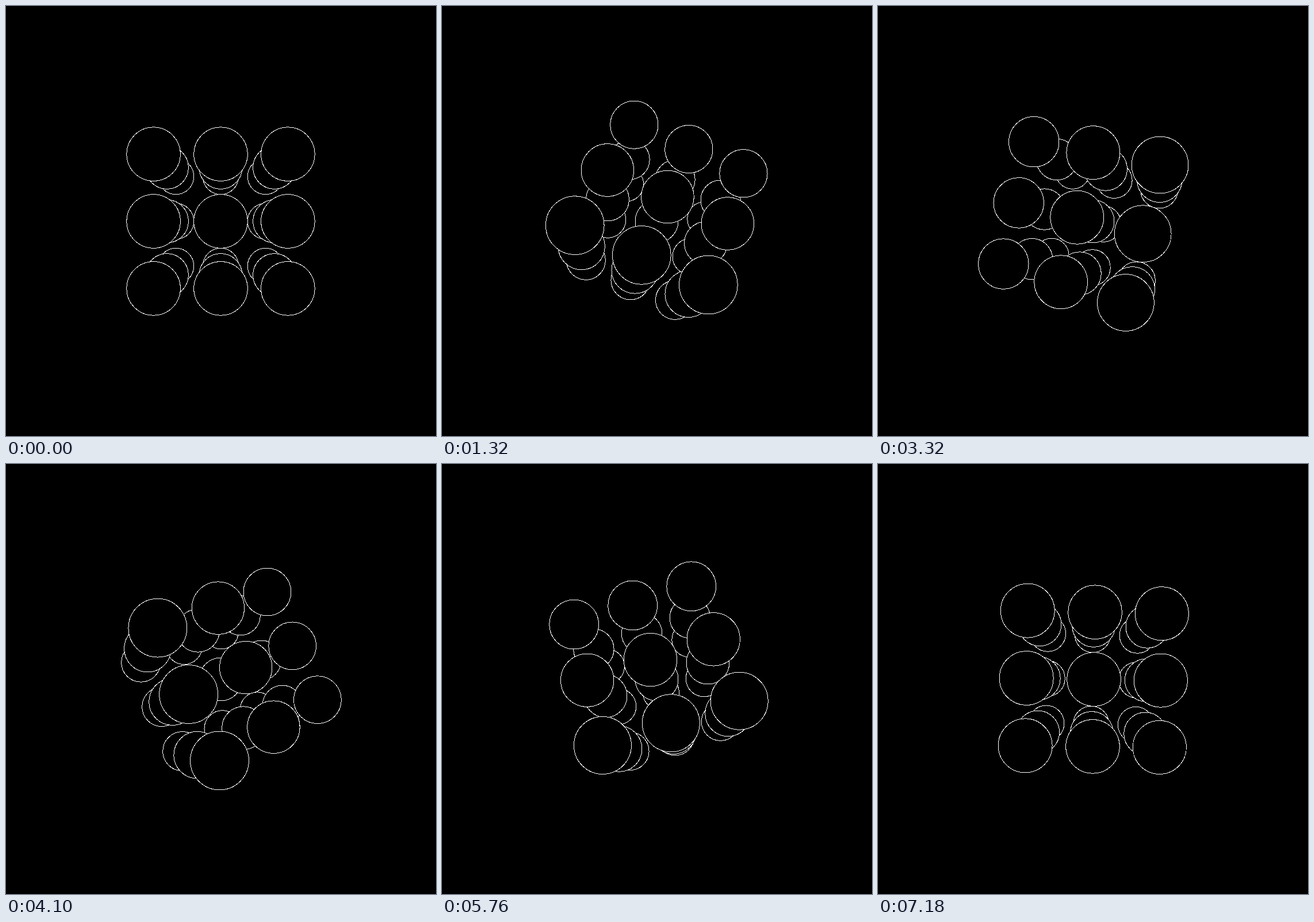
An HTML page for the animation above (7.2 s loop, 748 by 748 pixels).

```html
<!DOCTYPE html>
<html lang="en">
<head>
<meta charset="utf-8">
<title>Rotating lattice of circles</title>
<style>
html, body { margin: 0; width: 100%; height: 100%; overflow: hidden; background: #000; }
svg { display: block; width: 100%; height: 100%; }
circle { fill: #000; stroke: #fff; stroke-width: 1; shape-rendering: crispEdges; }
</style>
</head>
<body>
<svg viewBox="0 0 748 748"></svg>
<script>
const CX = 373.5, CY = 374.5;
const FOCAL = 467.5, DISTANCE = 5, RADIUS = 0.4;
const STEP_MS = 20, STEPS = 360;

const svg = document.querySelector('svg');
const axis = [-1, 0, 1];
const points = axis.flatMap(x => axis.flatMap(y => axis.map(z => [x, y, z])));
const circles = points.map(() =>
  svg.appendChild(document.createElementNS('http://www.w3.org/2000/svg', 'circle')));

// Turn about the vertical axis, then about the line of sight.
function project([x, y, z], sin, cos) {
  const turnedX = x * cos + z * sin;
  const depth = DISTANCE + z * cos - x * sin;
  const scale = FOCAL / depth;
  return {
    depth,
    cx: CX + scale * (turnedX * cos + y * sin),
    cy: CY + scale * (y * cos - turnedX * sin),
    r: scale * RADIUS
  };
}

function draw(time) {
  const step = Math.floor(time / STEP_MS) % STEPS;
  const angle = step * 2 * Math.PI / STEPS;
  const sin = Math.sin(angle), cos = Math.cos(angle);
  points.map(p => project(p, sin, cos))
    .sort((a, b) => b.depth - a.depth)
    .forEach((p, i) => {
      for (const name of ['cx', 'cy', 'r']) circles[i].setAttribute(name, p[name].toFixed(3));
    });
}

const start = performance.now();
function tick() {
  draw(performance.now() - start);
  requestAnimationFrame(tick);
}
tick();
</script>
</body>
</html>
```
